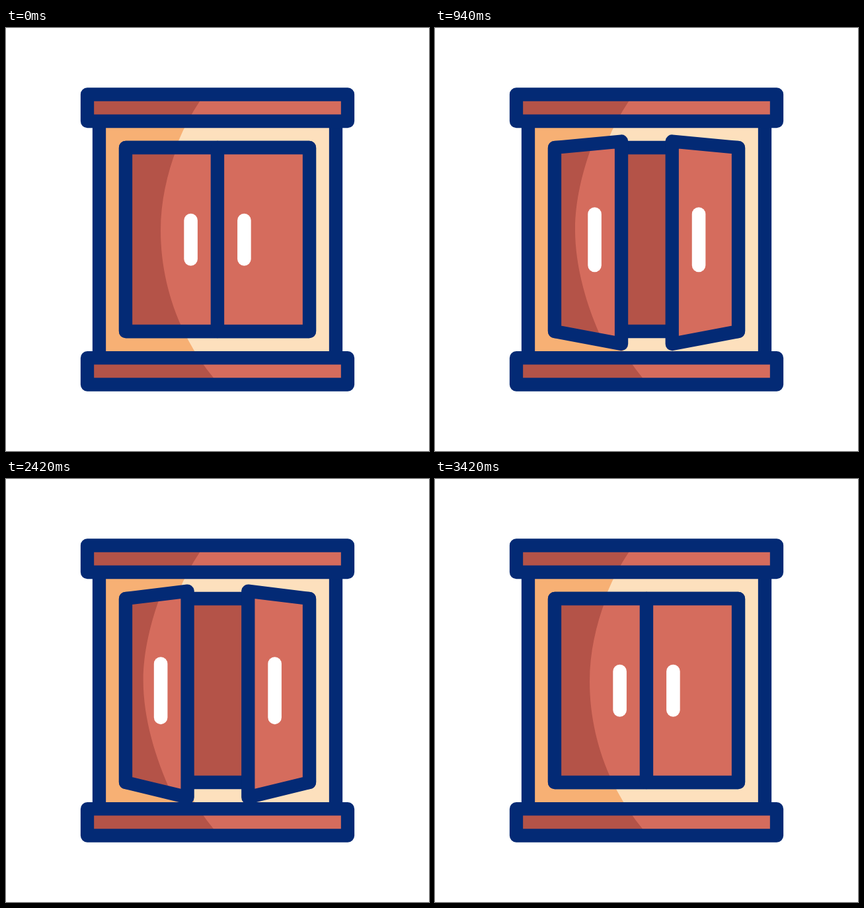
An HTML page with a canvas that plays this animation: 640 by 640 pixels, repeating every 3.6 s.

```html
<!DOCTYPE html>
<html lang="en">
<head>
<meta charset="utf-8">
<title>Cupboard</title>
<style>
  html, body { margin: 0; width: 100%; height: 100%; overflow: hidden; background: #fff; }
  canvas { display: block; }
</style>
</head>
<body>
<canvas id="stage" width="640" height="640"></canvas>
<script>
const ctx = document.getElementById("stage").getContext("2d");
const NAVY = "#032a75", RED = "#d56c5d", DARK = "#b45348";
const CREAM = "#fde0bd", ORANGE = "#f7b074";
const LOOP = 3600, MOVE = 1360, OPEN_AT = 200, CLOSE_AT = 2000;
const TOP = 181, BOTTOM = 459;

const lerp = (a, b, p) => a + (b - a) * p;

// Cubic Bezier easing with control points (.782, 0) and (.15, 1)
function ease(u) {
  if (u <= 0) return 0;
  if (u >= 1) return 1;
  let lo = 0, hi = 1;
  for (let i = 0; i < 30; i++) {
    const s = (lo + hi) / 2, r = 1 - s;
    const x = 3 * s * r * r * 0.782 + 3 * s * s * r * 0.15 + s * s * s;
    if (x < u) lo = s; else hi = s;
  }
  return lo * lo * (3 - 2 * lo);
}

function polygon(points) {
  const path = new Path2D();
  points.forEach(([x, y]) => path.lineTo(x, y));
  path.closePath();
  return path;
}

function box(x0, y0, x1, y1) {
  return polygon([[x0, y0], [x1, y0], [x1, y1], [x0, y1]]);
}

function outline(path) {
  ctx.strokeStyle = NAVY;
  ctx.lineWidth = 20.3;
  ctx.stroke(path);
}

// A filled, outlined shape whose shaded part is clipped to it
function panel(path, light, shade, shadow) {
  ctx.fillStyle = light;
  ctx.fill(path);
  if (shadow) {
    ctx.save();
    ctx.clip(path);
    ctx.fillStyle = shade;
    ctx.fill(shadow);
    ctx.restore();
  }
  outline(path);
}

const cabinetShadow = new Path2D();
cabinetShadow.rect(0, 0, 640, 640);
cabinetShadow.arc(586, 306, 352, 0, Math.PI * 2, true);

function doorShadow(p) {
  const topX = lerp(258.7, 232, p), topY = lerp(181, 174, p);
  const midX = lerp(234, 205, p), midY = lerp(306, 304, p);
  const endX = lerp(269, 249, p), endY = lerp(459, 478, p);
  const path = new Path2D();
  path.moveTo(100, 100);
  path.lineTo(topX + 15.2 * 1.5, topY - 40 * 1.5);
  path.lineTo(topX, topY);
  path.bezierCurveTo(topX - 15.2, topY + 40, midX, midY - 43, midX, midY);
  path.bezierCurveTo(midX, midY + lerp(53, 58, p),
    endX - lerp(23, 25, p), endY - lerp(47.7, 54, p), endX, endY);
  path.lineTo(endX + 12, endY + 24);
  path.lineTo(100, 520);
  path.closePath();
  return path;
}

function door(hinge, edge, handleX, p, shadow) {
  const path = polygon([
    [hinge, TOP], [edge, lerp(TOP, 168.5, p)],
    [edge, lerp(BOTTOM, 484, p)], [hinge, BOTTOM]
  ]);
  panel(path, RED, DARK, shadow);

  const half = lerp(29.2, 41.8, p);
  ctx.strokeStyle = "#fff";
  ctx.lineWidth = 20.6;
  ctx.beginPath();
  ctx.moveTo(handleX, 320.2 - half);
  ctx.lineTo(handleX, 320.2 + half);
  ctx.stroke();
}

const body = box(141, 121, 499, 519);
const opening = box(181, TOP, 459, BOTTOM);
const cornice = box(123, 100.5, 517, 141);
const plinth = box(123, 499.2, 517, 539.5);

function draw(t) {
  const p = ease((t - OPEN_AT) / MOVE) - ease((t - CLOSE_AT) / MOVE);
  ctx.fillStyle = "#fff";
  ctx.fillRect(0, 0, 640, 640);
  ctx.lineJoin = ctx.lineCap = "round";

  panel(body, CREAM, ORANGE, cabinetShadow);
  panel(opening, DARK);
  door(181, lerp(320, 270, p), lerp(279.6, 229.5, p), p, doorShadow(p));
  door(459, lerp(320, 371, p), lerp(360.4, 411.3, p), p);
  panel(cornice, RED, DARK, cabinetShadow);
  panel(plinth, RED, DARK, cabinetShadow);
}

const start = performance.now();
function frame() {
  draw((performance.now() - start) % LOOP);
  requestAnimationFrame(frame);
}
frame();
</script>
</body>
</html>
```
